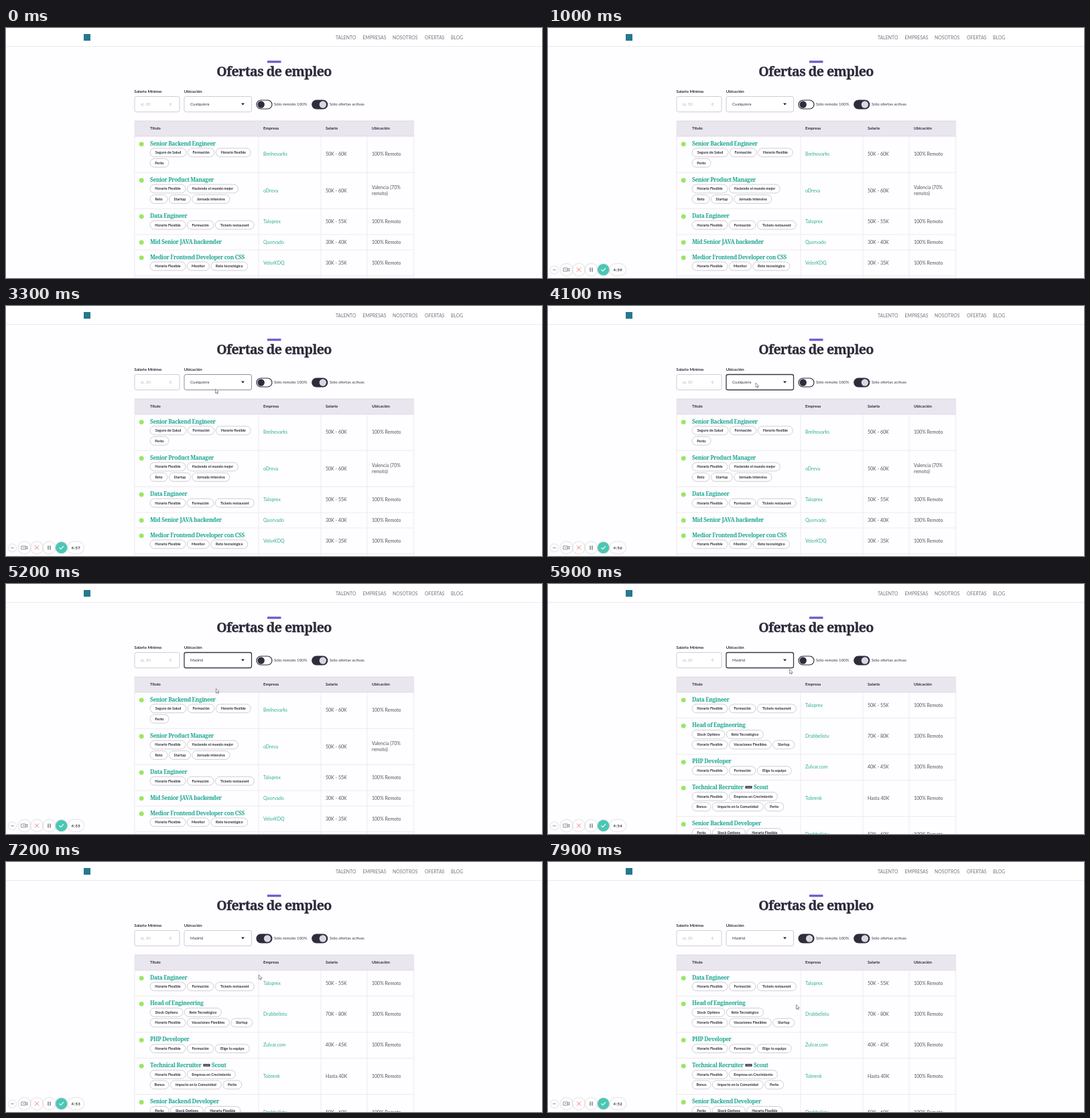
Recreate the animation shown at these times as an HTML page. Size 800 by 374 pixels, loop 8 s.

```html
<!DOCTYPE html>
<html lang="es">
<head>
<meta charset="utf-8">
<title>Ofertas de empleo</title>
<style>
  html, body { margin: 0; width: 100%; height: 100%; overflow: hidden; background: #fefdff; }
  svg { display: block; width: 800px; height: 374px; }
  text { font-family: Lato, sans-serif; font-size: 7px; fill: #55525f; }
  .nav { font-size: 6.9px; fill: #77747f; }
  .h1 { font: bold 19.7px "Noto Serif", serif; letter-spacing: -.032em; fill: #2d2a3a; stroke: #2d2a3a; stroke-width: .3; }
  .job { font: bold 8.35px "Noto Serif", serif; letter-spacing: -.042em; fill: #1fa892; }
  .firm { fill: #2fae98; }
  .label { font-size: 6.1px; font-weight: bold; fill: #2d2a3a; }
  .small { font-size: 6.1px; fill: #3a3746; }
  .hint { font-size: 6.1px; fill: #b9b6c2; }
  .chip { font-size: 5.4px; font-weight: bold; fill: #2d2a3a; }
  .clock { font-size: 6px; font-weight: bold; letter-spacing: .4px; fill: #33303d; }
  .line { stroke: #e8e5ec; stroke-width: .8; fill: none; }
  .pill { fill: #fff; stroke: #bbb8c3; stroke-width: .7; }
  .box { fill: #fff; stroke: #cbc7d3; stroke-width: .9; }
  .icon { fill: none; stroke: #85828d; stroke-width: .9; stroke-linecap: round; }
  .button { fill: #fff; filter: drop-shadow(0 .5px 1.3px #0004); }
</style>
</head>
<body>
<svg id="stage" viewBox="0 0 800 374"></svg>
<script>
const LOOP = 8000;
const CHIP_GAP = 2.4;
const HF = ['Horario Flexible', 53], FORM = ['Formación', 39.5], PERKS = ['Perks', 28];
const STOCK = ['Stock Options', 49], STARTUP = ['Startup', 32], TICKETS = ['Tickets restaurant', 58];
const REMOTE = ['100% Remoto'];

// title, company, salary, place lines, chip lines
const allJobs = [
  ['Senior Backend Engineer', 'Brelnovarks', '50K - 60K', REMOTE,
    [[['Seguro de Salud', 54], FORM, ['Horario flexible', 52]], [PERKS]]],
  ['Senior Product Manager', 'oDreva', '50K - 60K', ['Valencia (70%', 'remoto)'],
    [[HF, ['Haciendo el mundo mejor', 76]], [['Reto', 26], STARTUP, ['Jornada intensiva', 56]]]],
  ['Data Engineer', 'Taloprex', '50K - 55K', REMOTE, [[HF, FORM, TICKETS]]],
  ['Mid Senior JAVA backender', 'Quorvado', '30K - 40K', REMOTE, []],
  ['Medior Frontend Developer con CSS', 'VelorKDQ', '30K - 35K', REMOTE,
    [[HF, ['Monitor', 33], ['Reto tecnológico', 55]]]]
];
const madridJobs = [
  ['Data Engineer', 'Taloprex', '50K - 55K', REMOTE, [[HF, FORM, TICKETS]]],
  ['Head of Engineering', 'Drabbelistu', '70K - 80K', REMOTE,
    [[STOCK, ['Reto Tecnológico', 55]], [HF, ['Vacaciones Flexibles', 63], STARTUP]]],
  ['PHP Developer', 'Zulvar.com', '40K - 45K', REMOTE, [[HF, FORM, ['Elige tu equipo', 51]]]],
  ['Technical Recruiter|Scout', 'Tobrenk', 'Hasta 40K', REMOTE,
    [[HF, ['Empresa en Crecimiento', 72]], [['Bonus', 28], ['Impacto en la Comunidad', 76], PERKS]]],
  ['Senior Backend Developer', 'Drabbelistu', '50K - 60K', REMOTE,
    [[PERKS, STOCK, HF], [FORM]]]
];

const text = (x, y, s, cls = '', anchor = 'start') =>
  `<text x="${x}" y="${y}" class="${cls}" text-anchor="${anchor}">${s}</text>`;
const rect = (x, y, w, h, r, attrs) =>
  `<rect x="${x}" y="${y}" width="${w}" height="${h}" rx="${r}" ${attrs}/>`;
const path = (d, attrs) => `<path d="${d}" ${attrs}/>`;
const circle = (x, y, r, attrs) => `<circle cx="${x}" cy="${y}" r="${r}" ${attrs}/>`;

function chipLine(chips, y) {
  let x = 215, out = '';
  for (const [label, w] of chips) {
    out += rect(x, y - 6.4, w, 12.8, 6.4, 'class="pill"') +
      text(x + w / 2, y + 1.9, label, 'chip', 'middle');
    x += w + CHIP_GAP;
  }
  return out;
}

function jobTitle(title, y) {
  const [first, second] = title.split('|');
  let out = text(215, y, first, 'job');
  if (second) {
    out += rect(294.3, y - 4.9, 10.4, 4, .8, 'fill="#4b4855"') +
      path(`M296 ${y - 2.9}h7`, 'stroke="#aaa7b2" stroke-width=".9"') +
      text(307, y, second, 'job');
  }
  return out;
}

function jobTable(jobs) {
  let top = 162, out = '';
  for (const [title, firm, pay, place, chips] of jobs) {
    const h = chips.length ? 23.1 + 15.55 * chips.length : 23;
    const base = top + h / 2 + 2.3;
    out += circle(202.2, top + 11.7, 3.3, 'fill="#9be564" stroke="#a9ea78" stroke-width=".6" stroke-dasharray="1.8 1.2"') +
      jobTitle(title, top + 13.5) +
      chips.map((line, i) => chipLine(line, top + 24.3 + 15.5 * i)).join('') +
      text(384, base, firm, 'firm') + text(477, base, pay) +
      place.map((s, i) => text(546, base + 9 * (i - (place.length - 1) / 2), s)).join('');
    top += h;
    out += path(`M192 ${top}H609`, 'class="line"');
  }
  return out;
}

const nav = [[492, 'TALENTO'], [532.5, 'EMPRESAS'], [577, 'NOSOTROS'], [625, 'OFERTAS'], [664, 'BLOG']];
const DARK = '#2f2c3b', KNOB = '#dad6e2';

const page =
  rect(0, 0, 800, 27.5, 0, 'fill="#fff"') + path('M0 27.6H800', 'stroke="#e9e8ed" stroke-width="1"') +
  rect(116, 9, 10, 10, 0, 'fill="#26788f"') +
  nav.map(([x, s]) => text(x, 16.6, s, 'nav')).join('') +
  rect(390, 48.8, 20.5, 3.4, 0, 'fill="#6f5fd0"') +
  text(400, 71.7, 'Ofertas de empleo', 'h1', 'middle') +
  text(191.6, 97, 'Salario Mínimo', 'label') + text(265.7, 97, 'Ubicación', 'label') +
  rect(192, 102.5, 67, 23, 2.5, 'class="box"') +
  text(201, 116, 'ej. 30', 'hint') + text(244, 116, '€', 'hint') +
  rect(266, 102.5, 100.5, 23, 2.5, 'class="box" id="select"') +
  '<text id="place" class="small" x="275" y="116"></text>' +
  path('M351 112.6h5l-2.5 3z', 'fill="#1f1c28"') +
  `<g id="remote">${rect(374, 108, 23, 13, 6.5, `id="track" stroke="${DARK}" stroke-width="1.2"`)}
   ${circle(380.7, 114.5, 5.2, 'id="knob"')}</g>` +
  text(400, 116.3, 'Sólo remoto 100%', 'small') +
  rect(456.8, 108, 23, 13, 6.5, `fill="${DARK}" stroke="${DARK}" stroke-width="1.2"`) +
  circle(472.9, 114.5, 5.2, `fill="${KNOB}"`) +
  text(483, 116.3, 'Sólo ofertas activas', 'small') +
  rect(192, 139, 417, 23, 0, 'fill="#e9e6ef"') +
  path('M192 139H609M192 162H609', 'stroke="#d9d5e0" stroke-width=".8"') +
  [[215, 'Título'], [384, 'Empresa'], [477, 'Salario'], [546, 'Ubicación']]
    .map(([x, s]) => text(x, 152.4, s, 'label')).join('') +
  path('M192 139V374M377 162V374M470 162V374M539 162V374M608.7 139V374', 'class="line"') +
  `<g id="all">${jobTable(allJobs)}</g><g id="madrid">${jobTable(madridJobs)}</g>`;

const toolbar = '<g id="bar">' +
  circle(9.5, 361.8, 5.5, 'class="button"') + path('M7.5 361.8h4', 'class="icon"') +
  [27.5, 46, 64.5].map(x => circle(x, 361.5, 8.8, 'class="button"')).join('') +
  path('M23.2 359h6v5h-6zM29.2 361l2.8-1.6v4.4l-2.8-1.6M25.5 361.5h1.5', 'class="icon"') +
  path('M43.2 358.7l5.6 5.6m0-5.6l-5.6 5.6', 'class="icon" style="stroke:#ee6b70"') +
  path('M63 358.8v5.4m3-5.4v5.4', 'class="icon" style="stroke:#55525f;stroke-width:1.1"') +
  circle(82.7, 361.5, 8.6, 'class="button" style="fill:#4ac7b4"') +
  path('M79.7 361.6l2.1 2.1 4-4.3', 'class="icon" style="stroke:#fff;stroke-width:1.1"') +
  rect(92.5, 353, 23.5, 17, 8.5, 'class="button"') +
  '<text id="clock" class="clock" x="104.4" y="363.7" text-anchor="middle"></text></g>';

const pointer = '<g id="pointer" fill="#fff" stroke="#65626d" stroke-width=".7" stroke-linejoin="round">' +
  path('M0 0v6.6l1.6-1.4 1 2.3 1.1-.5-1-2.2h2.1z', 'id="arrow"') +
  path('M-.8.2q.8-.8 1.5 0v3l3 .6q.8.3.6 1.2l-.6 2.8h-3.2l-2.6-3q0-.9 1.3-.4z', 'id="hand"') + '</g>';

document.getElementById('stage').innerHTML = page + toolbar + pointer;
const el = Object.fromEntries([...document.querySelectorAll('[id]')].map(n => [n.id, n]));

const moves = [
  [2900, 340, 215], [3250, 312.5, 124], [3350, 312.5, 124], [3700, 310, 115], [4700, 310, 115],
  [5100, 313.5, 156.5], [5450, 313.5, 156.5], [6200, 386, 112], [6850, 386, 112], [7500, 370.5, 213.5], [8000, 370.5, 213.5]
];
const ease = p => p * p * (3 - 2 * p);

function pointerAt(t) {
  const i = Math.max(1, moves.findIndex(m => m[0] > t));
  const [t0, x0, y0] = moves[i - 1], [t1, x1, y1] = moves[i];
  const p = ease(Math.min(1, Math.max(0, (t - t0) / (t1 - t0))));
  return [x0 + (x1 - x0) * p, y0 + (y1 - y0) * p];
}

const show = (node, on) => { node.style.display = on ? '' : 'none'; };
const inside = (x, y, l, t, r, b) => x >= l && x <= r && y >= t && y <= b;

function draw(t) {
  const [x, y] = pointerAt(t);
  const visible = t >= moves[0][0];
  const overSelect = visible && inside(x, y, 266, 102, 366, 126);
  const overToggle = visible && inside(x, y, 374, 107, 397, 121);
  const focused = t >= 3750 && t < 6450;

  show(el.bar, t >= 500);
  const left = t < 800 ? 300 : 299 - Math.floor((t - 800) / 1000);
  el.clock.textContent = `${Math.floor(left / 60)}:${String(left % 60).padStart(2, '0')}`;

  el.select.style.stroke = focused ? '#3a3746' : overSelect ? '#85818f' : '';
  el.select.style.strokeWidth = focused ? 1.3 : '';
  el.place.textContent = t < 4800 ? 'Cualquiera' : 'Madrid';
  show(el.all, t < 5300);
  show(el.madrid, t >= 5300);

  const on = t >= 6450;
  const slide = ease(Math.min(1, Math.max(0, (t - 6450) / 150)));
  el.track.setAttribute('fill', on ? DARK : '#fff');
  el.knob.setAttribute('fill', on ? KNOB : DARK);
  el.knob.setAttribute('cx', 380.7 + 9.4 * slide);
  el.remote.style.opacity = overToggle ? .75 : 1;

  show(el.pointer, visible);
  show(el.arrow, !overToggle);
  show(el.hand, overToggle);
  el.pointer.setAttribute('transform', `translate(${x} ${y})`);
}

const start = performance.now();
function tick() {
  draw((performance.now() - start) % LOOP);
  requestAnimationFrame(tick);
}
tick();
</script>
</body>
</html>
```
